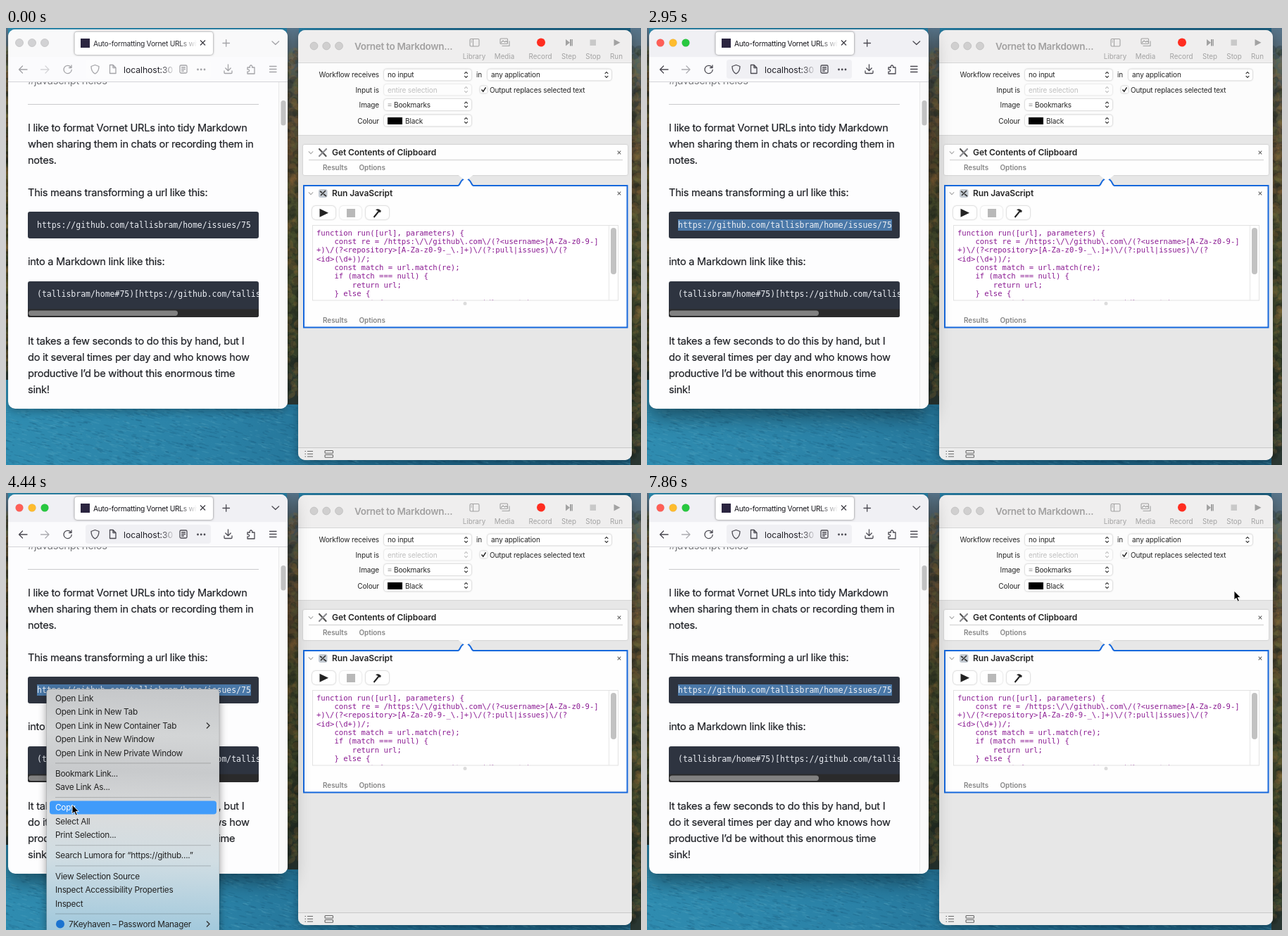
Recreate the animation shown at these times as an HTML page with a canvas. Size 902x621 px, loop 8000 ms.

```html
<!DOCTYPE html>
<html lang="en">
<head>
<meta charset="utf-8">
<title>Clipboard workflow</title>
<style>
html, body { margin: 0; width: 902px; height: 621px; overflow: hidden; background: #1d6484; }
canvas, svg { position: absolute; left: 0; top: 0; }
svg { --ink: #a4a4a8; --bar: #f9f9fa; --field: #fcfcfd; --l1: #d2d2d4; --l2: #d2d2d4; --l3: #d2d2d4; --edge: #bcbcbe; --title: #2a2a30; }
svg.active { --ink: #4b4a52; --bar: #f0f0f4; --field: #f0f0f4; --l1: #ff5f57; --l2: #febc2e; --l3: #28c840; --edge: #0001; --title: #15141a; }
text { font-family: Inter, "Open Sans", sans-serif; white-space: pre; }
.body { font-size: 14.6px; letter-spacing: -.27px; fill: #1f2126; stroke: #1f2126; stroke-width: .2; }
.menu { font-size: 11.8px; letter-spacing: -.25px; fill: #222; }
.label { font-size: 10px; letter-spacing: -.12px; fill: #242424; }
.end { text-anchor: end; }
.off { fill: #bebebe; }
.tool { font-size: 9.8px; fill: #a2a2a2; text-anchor: middle; }
.head { font-size: 12px; font-weight: 600; letter-spacing: -.1px; fill: #262626; }
.sub { font-size: 9.9px; font-weight: 600; fill: #858585; }
.code { font: 10.57px "DejaVu Sans Mono", monospace; fill: #8a1a92; }
.pre { font: 11.47px "DejaVu Sans Mono", monospace; fill: #eceff4; }
.line { fill: none; stroke: var(--ink); stroke-width: 1.3; stroke-linecap: round; stroke-linejoin: round; }
.grey { fill: none; stroke: #a2a2a2; stroke-width: 1.1; }
.pop { fill: #fff; filter: drop-shadow(0 .6px .8px #0005); }
#base { fill: #fdfdfe; filter: drop-shadow(0 4px 6px #0004); }
.active #base { filter: drop-shadow(0 10px 15px #0007); }
#flow { fill: #e7e7e7; filter: drop-shadow(0 4px 6px #0004); }
#menu > rect:first-child { filter: drop-shadow(0 3px 6px #0006); }
#beam { fill: none; }
#beam .halo { stroke: #fff; stroke-width: 2.6; }
#beam .core { stroke: #111; stroke-width: 1.1; }
</style>
</head>
<body>
<canvas id="coast" width="902" height="621"></canvas>
<svg id="stage" width="902" height="621" viewBox="0 0 902 621">
  <defs>
    <clipPath id="web"><rect x="3" y="2" width="397" height="539" rx="10"/></clipPath>
    <clipPath id="page"><rect x="3" y="77" width="397" height="464"/></clipPath>
    <clipPath id="snippet"><rect x="31" y="360" width="328" height="51" rx="3"/></clipPath>
    <clipPath id="app"><rect x="415" y="3" width="474" height="611" rx="10"/></clipPath>
    <clipPath id="editor"><rect x="436" y="282" width="420" height="104.5"/></clipPath>
    <clipPath id="tab"><rect x="100" y="8" width="171" height="28"/></clipPath>
    <linearGradient id="fadeTab"><stop offset="0" stop-color="#fff" stop-opacity="0"/><stop offset="1" stop-color="#fff"/></linearGradient>
    <linearGradient id="fadeUrl"><stop offset="0" stop-color="var(--field)" stop-opacity="0"/><stop offset="1" stop-color="var(--field)"/></linearGradient>
    <linearGradient id="glass" gradientUnits="userSpaceOnUse" x1="90" y1="279" x2="80" y2="621">
      <stop offset="0" stop-color="#c6c8ca"/><stop offset=".18" stop-color="#d3d5d6"/><stop offset=".33" stop-color="#c8cacc"/>
      <stop offset=".52" stop-color="#dadcdd"/><stop offset=".7" stop-color="#d0dde3"/><stop offset="1" stop-color="#a0c8dc"/>
    </linearGradient>
    <path id="step" d="M-2.3-1.6 0-4l2.3 2.4M-2.3 1.6 0 4l2.3-2.4" fill="none" stroke="#333" stroke-width="1.2"/>
    <path id="cross" d="M-2.3-2.3 2.3 2.3M2.3-2.3-2.3 2.3" stroke="#666" stroke-width="1.1"/>
    <path id="fold" d="M-3.2-1.6 0 1.6l3.2-3.2" fill="none" stroke="#aaa" stroke-width="1.1"/>
    <path id="bar" d="M-3-7.5q3 0 3 2.2 0-2.2 3-2.2M-3 7.5q3 0 3-2.2 0 2.2 3 2.2M0-5.5v11M-1.5 3h3"/>
  </defs>

  <!-- workflow editor -->
  <rect id="flow" x="415" y="3" width="474" height="611" rx="10"/>
  <g clip-path="url(#app)">
    <rect x="415" y="3" width="474" height="46.5" fill="#efeeee"/>
    <rect x="415" y="49.5" width="474" height="102.5" fill="#fcfcfc"/>
    <path d="M415 49.5h474M415 152.5h474" stroke="#d6d6d6"/>
    <rect x="415" y="597" width="474" height="17" fill="#ececec"/>
    <path d="M415 596.5h474" stroke="#c9c9c9"/>
    <g fill="#d0cfcf" stroke="#bcbbbb" stroke-width=".8"><circle cx="437.5" cy="25.5" r="5.4"/><circle cx="455.2" cy="25.5" r="5.4"/><circle cx="473" cy="25.5" r="5.4"/></g>
    <text x="495" y="30.5" style="font-size:13.5px;font-weight:600;letter-spacing:-.3px;fill:#a2a1a1">Vornet to Markdown...</text>
    <g class="grey">
      <rect x="659" y="15.5" width="13" height="10.5" rx="1.5"/><path d="M663.5 15.5v10.5M660.5 18h1.5M660.5 20h1.5"/>
      <rect x="702" y="15" width="10.5" height="7.5" rx="1"/><path d="M704.5 25.5h10.5v-7M703 21l3-3 2.5 2 2-1.5 2 2"/>
    </g>
    <circle cx="760" cy="20.5" r="6" fill="#ff2d20"/>
    <path d="M795 16l6 4.7-6 4.7zM801 16h2v9.4h-2zM803.5 16h1.5v9.4h-1.5zM863.5 16l9 4.7-9 4.7z" fill="#a2a2a2"/>
    <rect x="829.5" y="16.5" width="8.5" height="8.5" fill="#c9c9c9"/>

    <rect class="pop" x="537" y="58.5" width="124" height="16" rx="4"/>
    <rect class="pop" x="684" y="58.5" width="176" height="16" rx="4"/>
    <rect class="pop" x="537" y="80" width="124" height="15.5" rx="4" opacity=".6"/>
    <rect class="pop" x="537" y="101" width="124" height="16" rx="4"/>
    <rect class="pop" x="537" y="123.5" width="124" height="16" rx="4"/>
    <use href="#step" x="653.5" y="66.5"/><use href="#step" x="853" y="66.5"/>
    <use href="#step" x="653.5" y="87.7" opacity=".3"/><use href="#step" x="653.5" y="109"/><use href="#step" x="653.5" y="131.5"/>
    <rect class="pop" x="673.5" y="82.5" width="10" height="10" rx="2.5"/>
    <path d="M675.5 87.5l2.3 2.8 3.7-6" fill="none" stroke="#222" stroke-width="1.5"/>
    <path d="M542.5 108h5M542.5 110.5h5" stroke="#999"/>
    <rect x="542" y="127" width="21" height="10" fill="#000"/>

    <rect x="422" y="166" width="461" height="43" rx="2" fill="#fefefe" style="filter:drop-shadow(0 .5px 1px #0003)"/>
    <path d="M430 187.5h446" stroke="#d9d9d9" stroke-width="1.5"/>
    <use href="#fold" x="433" y="177"/><use href="#cross" x="871" y="177"/>
    <g fill="none" stroke-width="2.2" stroke-linecap="round"><path d="M445 172l9.5 10" stroke="#555"/><path d="M455 172l-10 10" stroke="#8b8b90"/></g>

    <path d="M423 224h219c3.5 0 3-10 11-10s7.5 10 11 10h218.5v201.5h-459.5z" fill="#fefefe" stroke="#1668dc" stroke-width="2"/>
    <path d="M642 208.5h22l-11 9z" fill="#fefefe"/>
    <use href="#fold" x="433" y="235"/><use href="#cross" x="871" y="235"/>
    <rect x="444" y="229" width="12.5" height="12" rx="3" fill="#c4cbd3"/>
    <path d="M447 238l7-7M446 232l3 2M451 236l4 3" stroke="#333" stroke-width="1.6"/>
    <rect class="pop" x="435" y="253" width="33" height="19" rx="5"/>
    <rect class="pop" x="474" y="253" width="31" height="19" rx="5" opacity=".6"/>
    <rect class="pop" x="511" y="253" width="33" height="19" rx="5"/>
    <path d="M445.5 256.8l12.5 6-12.5 6z" fill="#222"/>
    <rect x="484" y="257" width="12" height="12" fill="#b8b8b8"/>
    <path d="M522.5 269l7-8.5" stroke="#222" stroke-width="2"/><path d="M525 258.5c3-2 5-1.5 8 1.5l-1.8 2.6c-1.5-2-3.2-3-6.2-4.1z" fill="#222"/>
    <rect x="435.5" y="280.5" width="434" height="106.5" fill="#fff" stroke="#e2e2e2"/>
    <path d="M856.5 281v106" stroke="#e6e6e6"/>
    <rect x="859" y="284" width="8" height="66" rx="4" fill="#c2c2c2"/>
    <g id="code" clip-path="url(#editor)"></g>
    <circle cx="652" cy="391.5" r="2.5" fill="#dcdcdc"/>
    <g fill="none" stroke="#666" stroke-width="1.1">
      <path d="M424.5 601.5h1.5M428 601.5h8M424.5 605.2h1.5M428 605.2h8M424.5 609h1.5M428 609h8"/>
      <rect x="453" y="600.5" width="11.5" height="3.7" rx="1"/><rect x="453" y="606.5" width="11.5" height="3.7" rx="1"/>
    </g>
    <g id="appText"></g>
  </g>

  <!-- browser -->
  <rect id="base" x="3" y="2" width="397" height="539" rx="10"/>
  <g clip-path="url(#web)">
    <rect x="3" y="2" width="397" height="39.5" fill="var(--bar)"/>
    <rect x="3" y="41.5" width="397" height="35" fill="#fbfbfd"/>
    <path d="M3 76.5h397" stroke="#d4d4d8"/>
    <g stroke="var(--edge)" stroke-width=".7">
      <circle cx="19" cy="21" r="5.5" style="fill:var(--l1)"/><circle cx="37" cy="21" r="5.5" style="fill:var(--l2)"/><circle cx="55" cy="21" r="5.5" style="fill:var(--l3)"/>
    </g>
    <rect x="97.5" y="5.5" width="196.5" height="32.5" rx="4" fill="#fff" style="filter:drop-shadow(0 0 1.5px #0008)"/>
    <rect x="106" y="15" width="13" height="13" fill="#2b2540"/>
    <g clip-path="url(#tab)">
      <text x="124" y="25.5" style="font-size:10.3px;letter-spacing:-.3px;fill:var(--title)">Auto-formatting Vornet URLs with</text>
      <rect x="244" y="8" width="28" height="28" fill="url(#fadeTab)"/>
    </g>
    <path d="M276 17.5l7 7m0-7-7 7" stroke="#3b3a42" stroke-width="1.2"/>
    <path class="line" d="M308 21.5h9.5M312.7 16.7v9.5M378 19l4.8 4.5 4.8-4.5"/>
    <rect x="113" y="45" width="178" height="27" rx="4" fill="var(--field)"/>
    <g class="line">
      <path d="M30 59H18.5m5-5-5 5 5 5"/><path d="M49.5 59H61m-5-5 5 5-5 5" opacity=".45"/>
      <path d="M92 55.5a5.6 5.6 0 1 0 1.2 4M93 53v3.5h-3.5"/>
      <path d="M126.5 52.5l5.5 2c0 5-1.5 8.5-5.5 10.5-4-2-5.5-5.5-5.5-10.5z"/>
      <path d="M147.5 52.5h4.5l4 4v8h-8.5zM152 52.5v4h4"/>
      <rect x="247" y="53" width="10" height="11" rx="1.5"/><path d="M249.5 56h5M249.5 58.5h5M249.5 61h3"/>
      <path d="M315.5 52v8.5m-3.7-3.5 3.7 3.7 3.7-3.7M310 61v2.5q0 1 1 1h9q1 0 1-1V61"/>
      <path d="M343 56h3.5c-1.5-4 4.5-4 3 0h3.5v9h-10v-3c3.5 1 3.5-4 0-3z"/>
      <path d="M374.5 54.5h9.5M374.5 58.5h9.5M374.5 62.5h9.5"/>
    </g>
    <g fill="var(--ink)"><circle cx="272.5" cy="59" r="1.4"/><circle cx="277.2" cy="59" r="1.4"/><circle cx="282" cy="59" r="1.4"/></g>
    <text x="167" y="63.5" style="font-size:12.2px;letter-spacing:-.05px;fill:#222128">localhost:30</text>
    <rect x="220" y="47" width="20" height="23" fill="url(#fadeUrl)"/>

    <g clip-path="url(#page)">
      <path d="M31 108.5h328" stroke="#c9cacc"/>
      <rect x="31" y="261" width="328" height="38" rx="3" fill="#2e3440"/>
      <rect id="mark" x="44" y="272" height="16" fill="#4a78a8"/>
      <g id="pageText"></g>
      <g clip-path="url(#snippet)">
        <rect x="31" y="360" width="328" height="51" fill="#2e3440"/>
        <rect x="31" y="399.5" width="328" height="11.5" fill="#2a2a2b"/>
        <rect x="32" y="401.5" width="212" height="7.5" rx="3.7" fill="#818181"/>
        <text class="pre" x="44" y="382">(tallisbram/home#75)[https://github.com/tallisbram/home/issues/75]</text>
      </g>
      <path d="M387.5 77v464" stroke="#e9e9e9"/>
      <rect x="388" y="77" width="12" height="464" fill="#fafafa"/>
      <rect x="390.5" y="103" width="7" height="35.5" rx="3.5" fill="#c2c2c2"/>
    </g>
  </g>

  <g id="menu">
    <rect x="57.5" y="278.5" width="245.5" height="360" rx="5" fill="url(#glass)" stroke="#0003" stroke-width=".6"/>
    <rect id="hover" x="62" width="237" height="19" rx="4" fill="#409bfa"/>
    <circle cx="77" cy="612.5" r="6" fill="#1a73d0"/>
    <path d="M285 326.5l4 4-4 4M285 608.5l4 4-4 4" fill="none" stroke="#333" stroke-width="1.4"/>
  </g>

  <path id="arrow" d="M0 0v13l3-2.7 2.2 4.9 2.2-1-2.2-4.6h4.1z" stroke="#fff" stroke-width=".9"/>
  <g id="beam"><use href="#bar" class="halo"/><use href="#bar" class="core"/></g>
</svg>
<script>
const $ = id => document.getElementById(id);
const svg = (tag, attrs, parent) => {
  const el = document.createElementNS('http://www.w3.org/2000/svg', tag);
  for (const name in attrs) el.setAttribute(name, attrs[name]);
  return parent.appendChild(el);
};
const write = (parent, cls, x, y, words) => {
  const el = svg('text', { class: cls, x, y }, parent);
  el.textContent = words;
  return el;
};

[[80, '#javascript nelos'],
 [147, 'I like to format Vornet URLs into tidy Markdown'],
 [170, 'when sharing them in chats or recording them in'],
 [193, 'notes.'],
 [239, 'This means transforming a url like this:'],
 [337, 'into a Markdown link like this:'],
 [449.5, 'It takes a few seconds to do this by hand, but I'],
 [472.5, 'do it several times per day and who knows how'],
 [495.5, 'productive I’d be without this enormous time'],
 [518.5, 'sink!']].forEach(([y, words]) => write($('pageText'), 'body', 31, y, words));
$('pageText').firstChild.style = 'fill: #77787c; stroke: none';
write($('pageText'), 'pre', 44, 284, 'https://github.com/tallisbram/home/issues/75');

[['label end', 530, 70, 'Workflow receives'], ['label end', 530, 91.5, 'Input is'],
 ['label end', 530, 112.5, 'Image'], ['label end', 530, 135.5, 'Colour'],
 ['label', 542, 70, 'no input'], ['label', 668, 70, 'in'], ['label', 689, 70, 'any application'],
 ['label off', 542, 91.5, 'entire selection'], ['label', 687, 91.5, 'Output replaces selected text'],
 ['label', 551, 112.5, 'Bookmarks'], ['label', 567, 135.5, 'Black'],
 ['tool', 665, 43.5, 'Library'], ['tool', 708, 43.5, 'Media'], ['tool', 759, 43.5, 'Record'],
 ['tool', 799.5, 43.5, 'Step'], ['tool off', 834, 43.5, 'Stop'], ['tool', 867, 43.5, 'Run'],
 ['head', 463, 181.3, 'Get Contents of Clipboard'], ['head', 463, 239.3, 'Run JavaScript'],
 ['sub', 450, 202, 'Results'], ['sub', 501.5, 202, 'Options'],
 ['sub', 450, 418.5, 'Results'], ['sub', 501.5, 418.5, 'Options'],
].forEach(row => write($('appText'), ...row));

String.raw`function run([url], parameters) {
    const re = /https:\/\/github\.com\/(?<username>[A-Za-z0-9-]
+)\/(?<repository>[A-Za-z0-9-_\.]+)\/(?:pull|issues)\/(?
<id>(\d+))/;
    const match = url.match(re);
    if (match === null) {
        return url;
    } else {
        const {username, repository, id} = match`
  .split('\n').forEach((row, i) => write($('code'), 'code', 441, 294.7 + 12.35 * i, row));

// A dash stands for a separator line.
const rows = [];
let rowY = 291.7;
for (const words of ['Open Link', 'Open Link in New Tab', 'Open Link in New Container Tab', 'Open Link in New Window',
  'Open Link in New Private Window', '-', 'Bookmark Link...', 'Save Link As...', '-', 'Copy', 'Select All',
  'Print Selection...', '-', 'Search Lumora for “https://github....”', '-', 'View Selection Source',
  'Inspect Accessibility Properties', 'Inspect', '-', '7Keyhaven – Password Manager']) {
  if (words === '-') {
    svg('path', { d: `M70 ${rowY - 5}h221`, stroke: '#0003' }, $('menu'));
    rowY += 9.75;
  } else {
    const el = write($('menu'), 'menu', words[0] === '7' ? 89 : 70, rowY + 4, words);
    rows.push({ y: rowY, el });
    rowY += 19.45;
  }
}

function paintCoast() {
  const g = $('coast').getContext('2d');
  let seed = 7;
  const rand = () => (seed = seed * 16807 % 2147483647) / 2147483647;
  const fill = (colours, ...box) => {
    const shade = g.createLinearGradient(...box);
    colours.forEach((c, i) => shade.addColorStop(i / (colours.length - 1), c));
    g.fillStyle = shade;
  };
  fill(['#2f8cb0', '#2a81a6', '#1f678a', '#1c5a78'], 0, 541, 902, 621);
  g.fillRect(0, 0, 902, 621);
  for (let i = 0; i < 2600; i++) {
    g.fillStyle = rand() < .5 ? '#6fb9d026' : '#0b3f5e26';
    const x = rand() * 902, y = 535 + rand() * 86, w = 3 + rand() * 10;
    g.beginPath();
    g.ellipse(x, y, w / 2, .5 + rand() * .6, .25, 0, 7);
    g.fill();
  }
  const hills = ['#57748a', '#4a4b42', '#52432f', '#454a2e', '#3a4029', '#2e3829', '#2a3733'];
  for (const [x, w, end] of [[0, 3, 500], [399, 17, 535], [887, 15, 621]]) {
    fill(hills, 0, 0, 0, end);
    g.fillRect(x, 0, w, end);
    for (let y = 30; y < end - 12; y += 2) {
      g.fillStyle = ['#1c241c40', '#a0703a38', '#6d7a4030'][Math.floor(rand() * 3)];
      g.beginPath();
      g.ellipse(x + rand() * w, y, 2 + rand() * 5, 2 + rand() * 5, rand() * 3, 0, 7);
      g.fill();
    }
  }
}
paintCoast();

// Pointer path: tick, x, y. The screen refreshes once per tick.
const TICK = 148.1;
const path = [[3, 300, 480], [10, 66, 288], [13, 43.5, 282], [15, 56.5, 282], [20, 56.5, 282], [24, 55, 281],
  [25, 55, 281], [27, 360, 548], [30, 94, 443], [39, 94, 443], [42, 267, 427], [45, 595, 17],
  [47, 196, 518], [50, 520, 3], [53, 834, 139]];

function pointerAt(k) {
  const next = path.findIndex(p => p[0] > k);
  if (next < 0) return path[path.length - 1].slice(1);
  const b = path[next], a = path[next - 1] || b;
  const f = a === b ? 0 : (k - a[0]) / (b[0] - a[0]);
  return [a[1] + (b[1] - a[1]) * f, a[2] + (b[2] - a[2]) * f];
}
const show = (el, on) => el.style.display = on ? '' : 'none';

function draw(ms) {
  const k = Math.floor((ms + 14) / TICK);
  const [x, y] = pointerAt(k);
  $('stage').classList.toggle('active', k >= 3);
  show($('beam'), k >= 9 && k < 20);
  show($('arrow'), k >= 3 && k < 9 || k >= 24);
  for (const id of ['beam', 'arrow']) $(id).setAttribute('transform', `translate(${x} ${y})`);
  $('mark').setAttribute('width', k < 16 ? 0 : k < 18 ? 34.5 : 304);

  show($('menu'), k >= 24 && k < 36);
  $('menu').style.opacity = k === 35 ? .36 : 1;
  const inside = x > 57 && x < 303;
  const hit = rows.find(row => inside && Math.abs(row.y - y) < 9.7);
  show($('hover'), hit);
  if (hit) $('hover').setAttribute('y', hit.y - 9.8);
  rows.forEach(row => row.el.style.fill = row === hit ? '#fff' : '');
}

const start = performance.now();
function loop() {
  draw((performance.now() - start) % 8000);
  requestAnimationFrame(loop);
}
loop();
</script>
</body>
</html>
```
